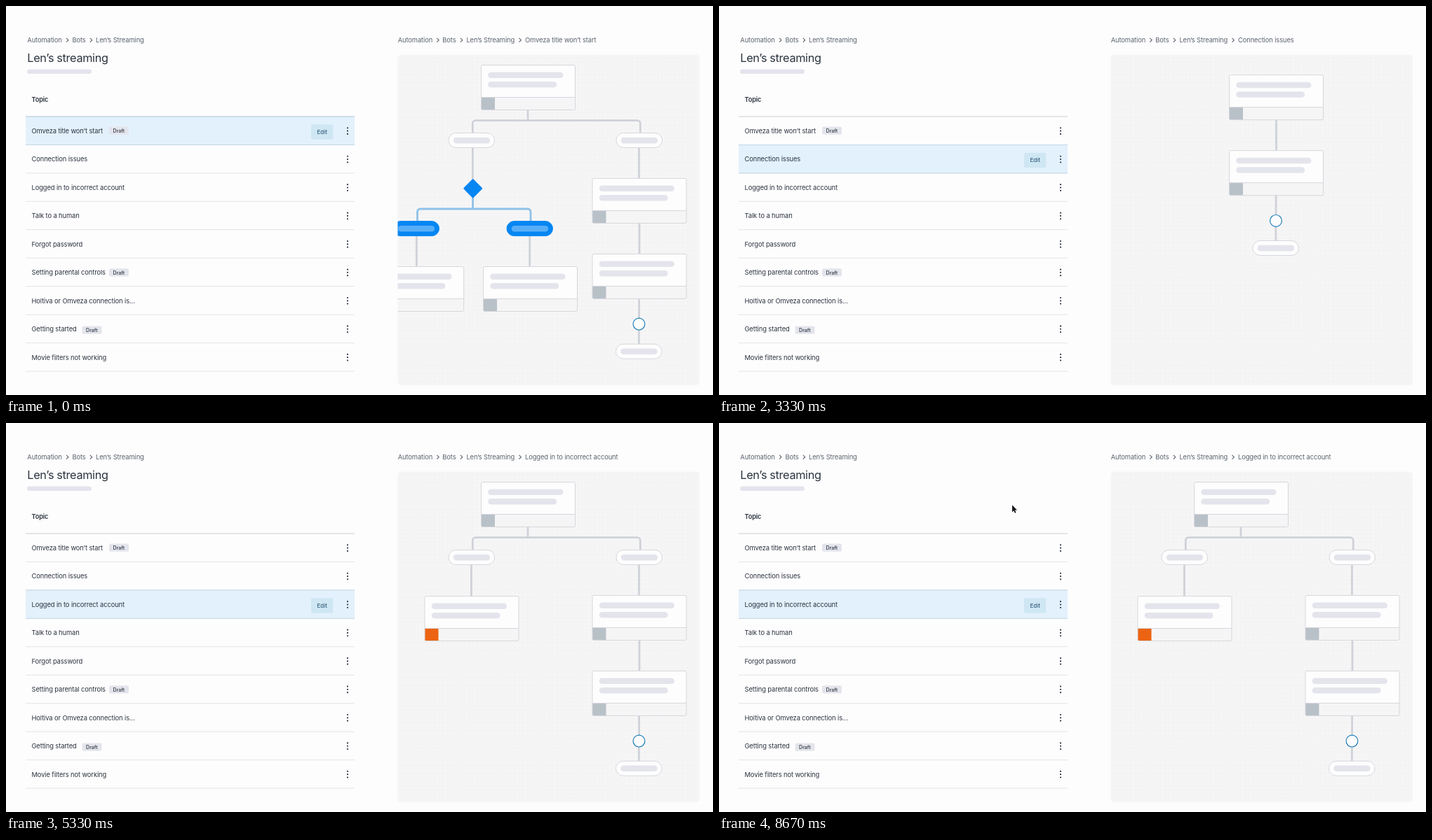
An HTML page with a canvas that plays this animation: 1008 by 556 pixels, repeating every 8.84 s.

```html
<!DOCTYPE html>
<html lang="en">
<head>
<meta charset="utf-8">
<title>Bot topics</title>
<style>
  html, body { margin: 0; width: 100%; height: 100%; overflow: hidden; background: #fefdfe; }
  canvas { display: block; width: 1008px; height: 556px; }
</style>
</head>
<body>
<canvas id="stage"></canvas>
<script>
const W = 1008, H = 556, LOOP = 8840;
const canvas = document.getElementById('stage');
const ctx = canvas.getContext('2d');
const ratio = window.devicePixelRatio || 1;
canvas.width = W * ratio;
canvas.height = H * ratio;

const FONT = 'Inter, "Open Sans", sans-serif';
const C = {
  page: '#fefdfe', panel: '#f6f5f6', dot: '#e9e8ea', bar: '#e4e5ec', edge: '#d6d7dc',
  link: '#cfd2d8', square: '#b9c1c8', orange: '#ec6413', blue: '#0586f2', paleBlue: '#57aef7',
  blueLink: '#8fc1e8', ring: '#1f7fb9', ink: '#2b343f', muted: '#59636d',
  rule: '#e3e2e6', headRule: '#cbcdd3', active: '#e3f1fc', activeRule: '#c2d9e5',
  button: '#cfe6f3', buttonInk: '#1d4b6c'
};

const topics = [
  { name: 'Omveza title won’t start', tag: [147, 172.5] },
  { name: 'Connection issues' },
  { name: 'Logged in to incorrect account' },
  { name: 'Talk to a human' },
  { name: 'Forgot password' },
  { name: 'Setting parental controls', tag: [147, 375.2] },
  { name: 'Holtiva or Omveza connection is...' },
  { name: 'Getting started', tag: [108.5, 457.4] },
  { name: 'Movie filters not working' }
];
const ROW_TOP = 158, ROW_H = 40.45;

function text(str, x, y, { size = 9.4, weight = 400, color = C.ink, spacing = -0.12 } = {}) {
  ctx.font = `${weight} ${size}px ${FONT}`;
  ctx.letterSpacing = spacing + 'px';
  ctx.fillStyle = color;
  ctx.fillText(str, x, y);
}

function box(x, y, w, h, r, fill, stroke) {
  ctx.beginPath();
  ctx.roundRect(x, y, w, h, r);
  if (fill) { ctx.fillStyle = fill; ctx.fill(); }
  if (stroke) { ctx.strokeStyle = stroke; ctx.lineWidth = 1; ctx.stroke(); }
}

function path(points, color, width) {
  ctx.beginPath();
  points.forEach(([x, y], i) => i ? ctx.lineTo(x, y) : ctx.moveTo(x, y));
  ctx.strokeStyle = color;
  ctx.lineWidth = width;
  ctx.stroke();
}

function disc(x, y, r, fill, stroke) {
  ctx.beginPath();
  ctx.arc(x, y, r, 0, Math.PI * 2);
  ctx.fillStyle = fill;
  ctx.fill();
  if (stroke) { ctx.strokeStyle = stroke; ctx.lineWidth = 1.2; ctx.stroke(); }
}

const rule = (y, color) => path([[28, y], [497, y]], color, 1);
const wire = (x, y1, y2) => path([[x, y1], [x, y2]], C.link, 2.8);

function crumbs(parts, gaps) {
  parts.forEach(([str, x]) => text(str, x, 52, { color: C.muted }));
  gaps.forEach(x => path([[x - 1.5, 45.8], [x + 1.4, 48.7], [x - 1.5, 51.6]], C.muted, 1.1));
}

function card(x, y, accent = C.square) {
  box(x, y, 134, 64, 2, C.page);
  box(x, y + 46, 134, 18, [0, 0, 2, 2], C.panel);
  box(x, y + 46, 19.5, 18, [0, 0, 0, 2], accent);
  path([[x, y + 46], [x + 134, y + 46]], C.edge, 1);
  box(x, y, 134, 64, 2, null, C.edge);
  box(x + 9.7, y + 10, 107.3, 8.6, 4.3, C.bar);
  box(x + 9.7, y + 23.5, 98, 8.6, 4.3, C.bar);
}

function pill(x, y, active) {
  box(x, y, 65.5, 21, 10.5, active ? C.blue : C.page, active ? C.blue : C.edge);
  box(x + 6.7, y + 6.3, 52.5, 8.6, 4.3, active ? C.paleBlue : C.bar);
}

// Bracket that splits one connector into two branches
function fork(mid, top, bar, left, right, bottom, color) {
  path([[mid, top], [mid, bar]], color, 2.8);
  ctx.beginPath();
  ctx.moveTo(left, bottom);
  ctx.arcTo(left, bar, left + 4, bar, 4);
  ctx.arcTo(right, bar, right, bar + 4, 4);
  ctx.lineTo(right, bottom);
  ctx.stroke();
}

// Two cards, a ring and an end pill
function chain(x, y) {
  wire(x + 67, y + 64, y + 108);
  wire(x + 66.6, y + 172, y + 200);
  wire(x + 66.4, y + 216, y + 237);
  card(x, y);
  card(x, y + 108);
  disc(x + 66.5, y + 208.2, 8.4, C.page, C.ring);
  pill(x + 33.5, y + 236.8);
}

function splitFlow() {
  fork(744, 149, 163.7, 665.3, 904.3, 181, C.link);
  card(677.5, 84.5);
  pill(631, 181.5);
  wire(902.5, 203, 246);
  pill(870, 181.5);
  chain(836, 246.4);
}

function diamond(x, y) {
  ctx.save();
  ctx.translate(x, y);
  ctx.rotate(Math.PI / 4);
  box(-9.9, -9.9, 19.8, 19.8, 1.5, C.blue);
  ctx.restore();
}

const flows = [
  () => {
    splitFlow();
    wire(665.4, 203, 248);
    fork(665.6, 273, 290, 586.5, 748, 308, C.blueLink);
    diamond(665.7, 260.7);
    wire(585.3, 329, 372);
    wire(746.7, 329, 372);
    pill(552, 307.6, true);
    pill(714, 307.6, true);
    card(518.7, 372.5);
    card(680.5, 372.5);
  },
  () => chain(727.5, 98.7),
  () => {
    splitFlow();
    wire(663.4, 203, 248);
    card(597, 247.5, C.orange);
  }
];

function drawList(current) {
  crumbs([['Automation', 30.3], ['Bots', 94.5], ['Len’s Streaming', 128]], [87.5, 121.3]);
  text('Len’s streaming', 30.3, 80.2, { size: 16.3, spacing: -0.35 });
  box(30, 90.4, 92, 6.6, 3.3, C.bar);
  text('Topic', 36.5, 137.4, { size: 9.2, weight: 600 });

  const top = ROW_TOP + current * ROW_H;
  box(28, top, 469, ROW_H, 0, C.active);
  rule(ROW_TOP, C.headRule);
  topics.forEach((_, i) => rule(ROW_TOP + (i + 1) * ROW_H, C.rule));
  rule(top, C.activeRule);
  rule(top + ROW_H, C.activeRule);

  topics.forEach(({ name, tag }, i) => {
    const mid = ROW_TOP + i * ROW_H + 20.6;
    text(name, 36.5, mid + 3.3);
    for (const d of [-4.3, 0, 4.3]) disc(487, mid + d, 1.1, C.ink);
    if (tag) {
      const [x, y] = tag;
      box(x, y, 28, 11.3, 2, C.bar);
      text('Draft', x + 5.6, y + 8.3, { size: 7, weight: 500, spacing: 0 });
    }
  });

  box(435, top + 11.3, 31.2, 21.5, 2, C.button);
  text('Edit', 443.4, top + 25, { size: 8.2, color: C.buttonInk, spacing: -0.05 });
}

function drawPanel(current) {
  crumbs([['Automation', 558.7], ['Bots', 622.3], ['Len’s Streaming', 656.4],
    [topics[current].name, 740]], [615.8, 649.4, 733]);
  ctx.save();
  box(558.5, 69.5, 430.5, 472.5, 5, C.panel);
  ctx.clip();
  ctx.fillStyle = C.dot;
  for (let y = 74; y < 542; y += 6)
    for (let x = 563; x < 989; x += 6) ctx.fillRect(x, y, 1, 1);
  flows[current]();
  ctx.restore();
}

function drawCursor(x, y) {
  ctx.beginPath();
  [[0, 0], [0, 10.2], [2.3, 8.1], [3.9, 11.6], [5.5, 10.9], [4, 7.4], [7, 7.2]]
    .forEach(([dx, dy]) => ctx.lineTo(x + dx, y + dy));
  ctx.closePath();
  ctx.strokeStyle = '#fff';
  ctx.lineWidth = 1.4;
  ctx.stroke();
  ctx.fillStyle = '#16181c';
  ctx.fill();
}

function draw(t) {
  ctx.setTransform(ratio, 0, 0, ratio, 0, 0);
  ctx.fillStyle = C.page;
  ctx.fillRect(0, 0, W, H);
  const current = t < 3330 ? 0 : t < 4500 ? 1 : 2;
  drawList(current);
  drawPanel(current);
  if (t >= 8670) drawCursor(418, 117.2);
}

const start = performance.now();
function tick() {
  draw((performance.now() - start) % LOOP);
  requestAnimationFrame(tick);
}
tick();
</script>
</body>
</html>
```
